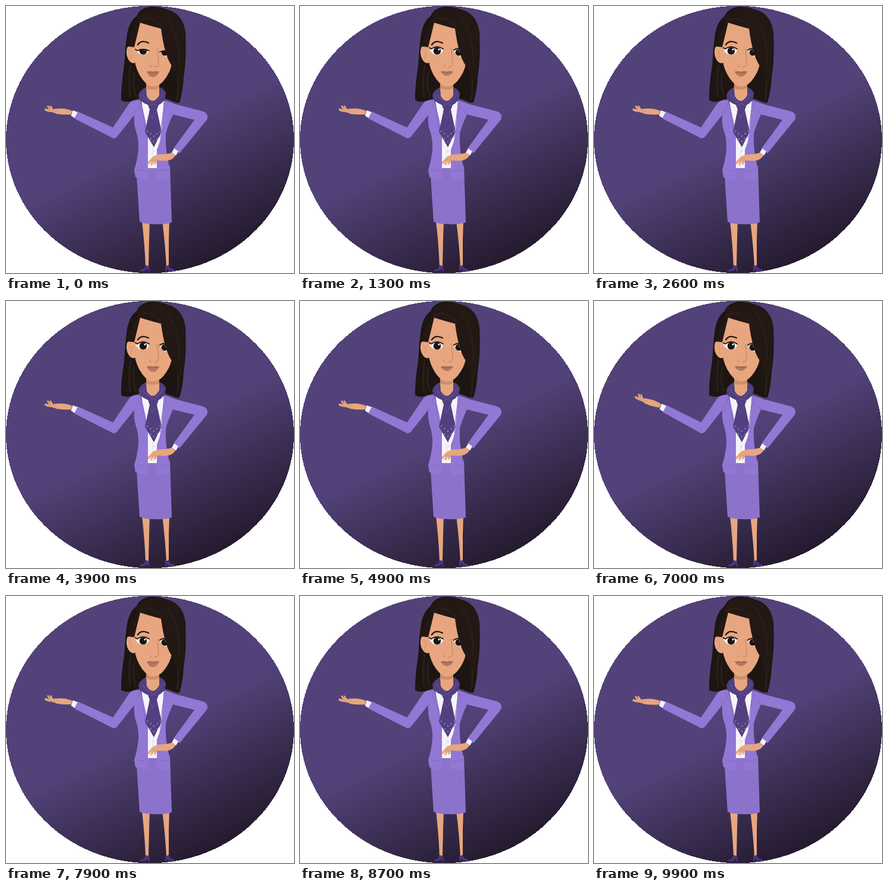
An HTML page for the animation above (10 s loop, 483 by 448 pixels).

```html
<!DOCTYPE html>
<html lang="en">
<head>
<meta charset="utf-8">
<title>Presenter</title>
<style>
html, body { margin: 0; width: 100%; height: 100%; overflow: hidden; background: #fff; }
svg { display: block; width: 483px; height: 448px; }
.skin { fill: #e7a67f; }
.shade { fill: #cd9069; }
.jacket { fill: #9277d5; }
.skirt { fill: #8d72cc; }
.dark { fill: #513f7f; }
.shoe { fill: #48357a; }
.hair { fill: #1d1512; }
.fringe { fill: #231814; }
.white { fill: #f6f4fa; }
.line { fill: none; stroke-linecap: round; stroke-linejoin: round; }
</style>
</head>
<body>
<svg viewBox="0 0 483 448">
  <defs>
    <linearGradient id="night" gradientUnits="userSpaceOnUse" x1="139" y1="276" x2="243" y2="481">
      <stop stop-color="#524279"/>
      <stop offset="1" stop-color="#241a2d"/>
    </linearGradient>
    <clipPath id="eyeL"><path d="M217 73Q222 68 231 68Q238 68 240 73Q239 81 230 82Q222 82 217 73Z"/></clipPath>
    <clipPath id="eyeR"><path d="M258 75Q262 70 273 71V85Q262 86 258 75Z"/></clipPath>
  </defs>
  <ellipse cx="241.5" cy="224" rx="241.5" ry="224.3" fill="url(#night)" shape-rendering="crispEdges"/>

  <g id="legs">
    <path class="skin" d="M228 360H241L240 392L239 438H234Q233 405 228 360ZM262 360H274L273 392L273 438H269Q267 400 262 360Z"/>
    <path class="shoe" d="M235 434Q237 438 240 434L241 445L239 446L238 441Q234 446 224 445Q226 441 231 441ZM267 434Q270 438 272 434L276 440Q283 442 284 445Q274 447 270 441L269 446H267Z"/>
  </g>

  <path class="hair" d="M246 1C232 1 222 8 219 17C208 25 204 38 202 55C199 75 200 93 196 115Q193 138 193 158Q202 164 218 157L244 148L275 158Q284 163 291 162Q297 142 298 118C302 95 302 67 301 46C298 22 279 2 246 1Z"/>
  <path class="line" d="M209 100Q205 125 208 151M215 112Q211 135 218 151M286 108Q292 130 287 157" stroke="#2a1f1a" stroke-width="3"/>

  <path class="skirt" d="M218 268H275L278 363Q267 367 248 366Q232 366 224 362Z"/>
  <path class="white" d="M227 160H265L261 220L253 242V272H238V220Z"/>
  <path class="line" d="M246 238V268" stroke="#dedbe6" stroke-width="1"/>
  <circle cx="248.500" cy="244" r="1" fill="#c9c4d6"/>
  <circle cx="248.500" cy="257" r="1" fill="#c9c4d6"/>

  <g id="forearm">
    <path class="jacket" d="M120 177L180 204L188 211Q187 222 180 222L115 189Z"/>
    <path class="white" d="M112 175L120 178L115 188L109 184Z"/>
    <g id="palm">
      <path class="skin" d="M111 176Q102 172 92 172Q84 172 79 173L76 168Q74 166 73 168L75 173L71 167Q69 166 69 169L72 174L67 172Q64 172 65 175Q69 178 76 178Q81 179 85 181Q98 183 109 182Z"/>
      <path class="line" d="M78 174Q81 178 87 176M71 175L77 177" stroke="#cd9069" stroke-width=".8"/>
    </g>
  </g>

  <path class="jacket" d="M225 158Q212 157 207 163L180 203Q173 214 178 221Q184 223 188 217L215 183Q214 199 218 210Q223 225 222 241Q220 260 215 275L217 287Q226 292 238 291V220Q235 190 226 162Z"/>
  <path class="jacket" d="M266 158L285 165L331 177Q338 180 338 186Q338 190 335 193L291 247L281 239L316 191L280 182Q271 202 268 214Q267 239 272 260L275 275V290Q264 292 253 291V242Q262 225 264 163Z"/>
  <path class="line" d="M215 184L219 174M279 182L275 175M223 162L222 171L228 174L235 215M268 162L269 171L264 175L258 220M219 275L235 277M256 277L272 275" stroke="#8368c4" stroke-width="1"/>

  <path class="white" d="M282 239L289 244L285 251L278 246Z"/>
  <path class="skin" d="M279 246Q270 249 258 249Q249 250 244 255L238 262Q237 266 240 265L245 260L242 266Q243 269 245 266L249 260L248 265Q249 268 251 265L254 259Q269 261 276 258Q281 256 284 251Z"/>
  <path class="line" d="M244 261L249 256M249 261L253 257" stroke="#cd9069" stroke-width=".8"/>

  <path class="skin" d="M235 124H257V153L247 164L235 153Z"/>
  <path class="shade" d="M235 130Q246 140 257 130V138Q246 143 235 138Z"/>
  <path class="dark" d="M235 136Q223 142 222 151Q224 161 238 166L241 174L233 211L248 237L261 211L253 174L256 166Q268 160 268 146Q265 139 257 136V150Q246 168 236 151Z"/>
  <path class="line" d="M229 148Q234 158 245 163M263 147Q259 157 249 163M240 177L246 188L253 176M241 167L248 164L253 167" stroke="#6a569e" stroke-width="1"/>
  <g id="dots" fill="#a293cf"></g>

  <g id="head">
    <path class="skin" d="M217 71Q208 63 203 70Q200 82 206 91Q211 98 217 95Z"/>
    <path class="line" d="M206 75Q210 74 211 82L209 88" stroke="#cd9069" stroke-width="1"/>
    <path class="skin" d="M225 25L215 68L217 98Q222 117 234 129Q240 135 247 135Q256 135 264 126Q276 111 278 97V70L264 35Z"/>
    <path class="line" d="M254 72L256 96Q256 103 249 102M242 99Q240 102 244 102" stroke="#c78559" stroke-width="1.2"/>
    <g clip-path="url(#eyeL)">
      <path class="white" d="M214 65H243V85H214Z"/>
      <circle cx="230" cy="75.500" r="6.200" fill="#1d1411"/>
      <circle cx="233" cy="73" r="1.500" fill="#fff"/>
      <rect class="lid skin" x="214" width="29" y="55" height="12"/>
    </g>
    <g clip-path="url(#eyeR)">
      <path class="white" d="M255 65H280V89H255Z"/>
      <circle cx="266" cy="78" r="5.500" fill="#1d1411"/>
      <circle cx="268" cy="75.500" r="1.400" fill="#fff"/>
      <rect class="lid skin" x="255" width="25" y="57" height="12"/>
    </g>
    <path id="lashes" class="line" stroke="#1b1512" stroke-width="1.900"/>
    <path class="line" d="M221 65Q227 56 239 62" stroke="#211713" stroke-width="2.300"/>
    <path id="mouth" fill="#b6775f"/>
    <path id="lips" class="line" stroke="#995b4a" stroke-width="1"/>
    <path class="fringe" d="M221 31Q216 18 229 9Q249 -2 277 8Q299 18 301 47L298 117L293 130Q284 116 278 100Q266 84 260 38Q244 34 225 28L215 69L205 68Q207 45 221 31Z"/>
    <path class="line" d="M224 25Q241 12 262 36M271 20Q293 55 290 100" stroke="#2c201b" stroke-width="2"/>
  </g>
</svg>
<script>
const LOOP = 10000, STEP = 100;
const $ = id => document.getElementById(id);
const lids = document.querySelectorAll(".lid");

// Scarf pattern: two chevrons following the pointed tip.
function chevron(tipY, reach) {
  return Array.from({ length: 2 * reach + 1 }, (_, i) => {
    const x = 248 + (i - reach) * 5.5, y = tipY - 4 * Math.abs(i - reach);
    return `<path d="M${x - 2} ${y}L${x} ${y + 1}L${x + 2} ${y - 1}L${x} ${y + 3}Z"/>`;
  }).join("");
}
$("dots").innerHTML = chevron(217, 2) + chevron(226, 1);

const pulse = (t, at, width) => Math.exp(-(((t - at) / width) ** 2));

function blinkAmount(t) {
  const phase = (t + 100) % 5000;
  return phase < 400 ? Math.sin(phase / 400 * Math.PI) : 0;
}

function drawEyes(closed) {
  lids.forEach(lid => lid.setAttribute("height", 12 + 8 * closed));
  const y = 72 + 4 * closed, top = 67 + 8 * closed;
  $("lashes").setAttribute("d",
    `M217 ${y - 2}L220 ${y}Q230 ${top - 2} 240 ${y}M258 ${y + 2}Q264 ${top + 2} 272 ${y + 1}`);
}

function drawMouth(t) {
  const open = .5 + .5 * Math.sin(t / LOOP * Math.PI * 56 + 1.2);
  const y = 110, low = 117 + 2.5 * open;
  $("mouth").setAttribute("d",
    `M236 ${y}Q242 ${y - 2} 246 ${y}Q251 ${y - 2} 257 ${y}Q253 ${low} 246 ${low}Q239 ${low - 1} 236 ${y}Z`);
  $("lips").setAttribute("d", `M237 ${y + 1}Q246 ${y + 2 + 2 * open} 256 ${y + 1}`);
}

function drawArm(t) {
  const lift = pulse(t, 7000, 520);
  const sway = -1.2 * (pulse(t, 5900, 400) + pulse(t, 9900, 250));
  $("forearm").setAttribute("transform", `rotate(${2 * lift} 182 214)`);
  $("palm").setAttribute("transform", `rotate(${11 * lift + sway} 112 179)`);
}

function render(now) {
  const t = Math.floor(now % LOOP / STEP) * STEP;
  drawEyes(blinkAmount(t));
  drawMouth(t);
  drawArm(t);
}

const start = performance.now();
function tick() {
  render(performance.now() - start);
  requestAnimationFrame(tick);
}
tick();
</script>
</body>
</html>
```
